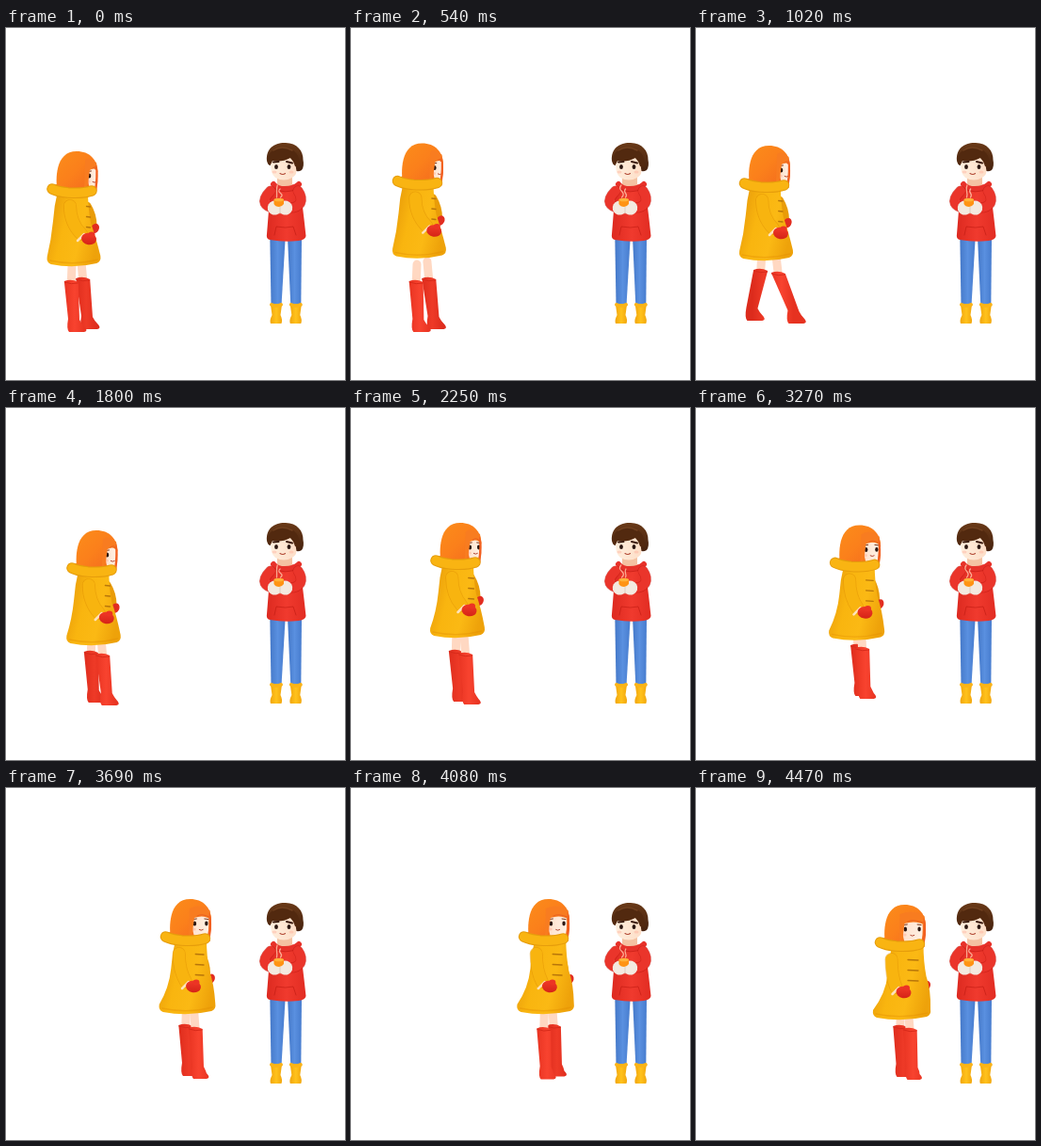
An HTML page with a canvas that plays this animation: 360 px wide and 374 px high, repeating every 4.5 s.

```html
<!DOCTYPE html>
<html lang="en">
<head>
<meta charset="utf-8">
<title>Winter walk</title>
<style>
html, body { margin: 0; width: 100%; height: 100%; overflow: hidden; background: #fff; }
canvas { display: block; width: 360px; height: 374px; }
</style>
</head>
<body>
<canvas id="stage"></canvas>
<script>
const W = 360, H = 374, STEP = 30, COUNT = 150;
const canvas = document.getElementById('stage');
const ctx = canvas.getContext('2d');
const dpr = window.devicePixelRatio || 1;
canvas.width = W * dpr;
canvas.height = H * dpr;

// step, body x, head top, turn (0 profile, 1 front), ground
const path = [
  [0, 72, 127, 0, 323],
  [24, 72.8, 127, .02, 322],
  [34, 74.5, 127, .04, 314],
  [60, 93, 126, .16, 316],
  [75, 113, 126, .25, 315],
  [95, 146.5, 125, .36, 310],
  [123, 192.5, 122, .68, 309],
  [149, 218.5, 124, 1, 310]
];
// phase within a footstep, head bob, distance between the feet
const stride = [
  [0, 4, -14], [3, -4, 11], [5, -4.5, 11], [8, -4, 30],
  [10, -2, 44], [11, 2, 38], [12, 4, 14]
];

const mix = (a, b, k) => a + (b - a) * k;
const clamp = v => Math.max(0, Math.min(1, v));

// Hermite curve through one column of a table
function curve(rows, x, col) {
  const last = rows.length - 1;
  let i = 0;
  while (i < last - 1 && x >= rows[i + 1][0]) i++;
  const slope = j => {
    const a = rows[Math.max(0, j - 1)], b = rows[Math.min(last, j + 1)];
    return (b[col] - a[col]) / (b[0] - a[0]);
  };
  const a = rows[i], b = rows[i + 1], d = b[0] - a[0];
  const k = (x - a[0]) / d, k2 = k * k, k3 = k2 * k;
  return (2 * k3 - 3 * k2 + 1) * a[col] + (k3 - 2 * k2 + k) * d * slope(i) +
    (3 * k2 - 2 * k3) * b[col] + (k3 - k2) * d * slope(i + 1);
}

function shade(x0, y0, x1, y1, ...colors) {
  const g = ctx.createLinearGradient(x0, y0, x1, y1);
  colors.forEach((c, i) => g.addColorStop(i / (colors.length - 1), c));
  return g;
}

function fill(d, color) {
  ctx.fillStyle = color;
  ctx.fill(new Path2D(d));
}

function line(d, color, width) {
  ctx.strokeStyle = color;
  ctx.lineWidth = width;
  ctx.stroke(new Path2D(d));
}

function oval(x, y, rx, ry, color, turn = 0) {
  ctx.fillStyle = color;
  ctx.beginPath();
  ctx.ellipse(x, y, rx, ry, turn, 0, Math.PI * 2);
  ctx.fill();
}

function boot(mid, reach, ground, toe, light, dark) {
  const spread = 9.5 * Math.tanh(reach / 9);
  const x = mid + reach, knee = 3.5 + spread, top = ground - 54;
  line(`M${3 + spread * .8} ${top - 18}L${knee} ${top + 2}`, '#ffd8c2', 9);
  fill(`M${knee - 7.5} ${top}Q${knee} ${top - 3} ${knee + 7.5} ${top + 1}
    L${x + 6} ${ground - 13}Q${x + 8} ${ground - 9} ${x + toe - 2} ${ground - 6}
    Q${x + toe + 3} ${ground - 1} ${x + toe - 2} ${ground}
    L${x - 5} ${ground}Q${x - 8} ${ground - 3} ${x - 6} ${ground - 14}Z`,
    shade(knee - 9, 0, knee + 16, 0, dark, light, dark));
  line(`M${knee - 7} ${top + 1}Q${knee} ${top + 4} ${knee + 7} ${top + 2}`, '#d82a1a', 1);
}

function girlHead(u) {
  fill('M-17 46C-20 30-20 0 3 0C17 0 25 9 25.5 22L24 45Z',
    shade(-18, 0, 22, 40, '#fb8c1a', '#fb801b', '#f46b1e'));
  const left = mix(15, 1, u), right = mix(24, 22, u);
  fill(`M${left} 18L${right} 18Q${right + 1} 34 ${right - 2} 41
    Q${mix(left, right, .5)} 46 ${left + 2} 40Q${left - 1} 30 ${left} 18Z`,
    shade(left, 0, right, 0, '#ffe1cd', '#fff0e3'));

  const eye = mix(16.5, 3.8, u), eye2 = mix(24, 18.6, u);
  oval(eye, 26, 1.8, 2.5, '#2b1712');
  line(`M${eye - 2} 21.5L${eye + 2} 21`, '#7a3517', 1);
  if (u > .2) {
    oval(eye2, 26, 1.7, 2.4, '#2b1712');
    line(`M${eye2 - 2} 21L${eye2 + 2} 21.5`, '#7a3517', 1);
  }
  const mouth = mix(22, 11.3, u);
  line(`M${mouth - 2} 32.5Q${mouth} 34 ${mouth + 2} 32.5`, '#b14632', 1);
  oval(eye - 1, 32, 2.4, 1.5, 'rgba(255,165,140,.4)');

  // fringe and side locks
  fill(`M${left - 3} 10Q12 4 24 12L25.5 22Q${mix(22, 15, u)} 16 ${left + 2} 20L${left} 35L${left - 4} 42Z`, '#f87c20');
  fill('M23 14Q26 18 25.5 32L24 43L22 40Q24 28 23 14Z', '#f26022');
  line(`M${left + 5} 18Q${left + 10} 15 23 19`, '#ea601f', 1);
}

function girl(f) {
  const phase = f % 12, side = Math.floor(f / 12) % 2 ? -1 : 1;
  const sway = 1 - clamp((f - 136) / 10);
  const x = curve(path, f, 1);
  const y = curve(path, f, 2) + curve(stride, phase, 1) * sway;
  const u = clamp(curve(path, f, 3));
  const ground = curve(path, f, 4) - y;
  const reach = curve(stride, phase, 2) * side / 2;
  const mid = 7 - u * 1.5, toe = mix(13, 10, u);

  ctx.save();
  ctx.translate(x, y);

  boot(mid, -reach, ground - 3, toe, '#ee3a27', '#dc2b1c');
  boot(mid, reach, ground, toe, '#f8432f', '#e63220');

  // far arm
  line('M14 58Q20 68 20 79', '#e99c08', 9);
  oval(mix(22.5, 26, u), mix(82, 86, u), 4.2, 5.5, '#e22d20', .5);

  const hem = mix(28.3, 30.5, u);
  const back = mix(-20, -13, u), front = mix(15, 23, u);
  fill(`M${back + 3} 42Q${back - 1} 58 ${back - 2} 74Q${back - 4} 94 ${-hem} 112
    Q${-hem - 1} 118 ${4 - hem} 120Q0 125 ${hem - 4} 119Q${hem + 1} 117 ${hem} 111
    Q${front + 8} 90 ${front + 3} 76Q${front} 60 ${front} 42Z`,
    shade(-hem, 70, hem, 84, '#e99c0a', '#f9b50f', '#fbb914', '#eea20a'));
  line(`M${3 - hem} 116Q0 122 ${hem - 3} 115`, 'rgba(226,140,0,.4)', 1.4);

  // toggles
  const tx = mix(15.5, 12, u), tw = mix(2, 5.5, u);
  for (const ty of [59, 70, 81]) line(`M${tx - tw} ${ty - .5}L${tx + tw} ${ty}`, '#b8760a', 1.3);

  // near arm
  const hand = mix(16, 2, u), sx = mix(-4, -11, u);
  const sleeve = `M${sx} 58Q${sx} 76 ${hand - 8} 88`;
  line(sleeve, 'rgba(214,134,0,.4)', 14);
  line(sleeve, '#f8b40f', 12.5);
  line(`M${hand - 12} 95L${hand - 5} 88`, '#ffe3bd', 2.5);
  oval(hand, 93, 8, 6.3, shade(0, 86, 0, 100, '#f23b29', '#d42216'), .15);
  oval(hand + 3, 88.5, 3.5, 3, '#ec3424');

  // hood and head
  oval(-2, 40, 25, 6.5, '#e39206');
  girlHead(u);
  const rim = 'M-23 40Q-17 43-6 44Q10 45 19 42';
  line(rim, '#e69d0b', 11.5);
  line(rim, '#f9b412', 9.5);
  ctx.restore();
}

// one trouser leg from hip x to foot x, with its boot
function manLeg(hip, foot, w) {
  fill(`M${hip - w} 222H${hip + w}L${foot + 5.5} 295H${foot - 5.5}Z`,
    shade(hip - w, 0, hip + w, 0, '#4478c8', '#5a90e0', '#477cce'));
  fill(`M${foot - 6} 294L${foot - 4.5} 305Q${foot - 7.5} 311 ${foot - 6} 314H${foot + 5.5}Q${foot + 7} 310 ${foot + 4.5} 305L${foot + 6} 294Z`,
    shade(foot - 7, 0, foot + 7, 0, '#f0a30c', '#ffc21c', '#f0a30c'));
  line(`M${foot - 5} 294Q${foot} 296 ${foot + 5} 294`, '#fbb418', 4);
}

function manHead() {
  fill('M288 156H304V170Q296 174 288 170Z', '#f4c2a2');
  fill('M277 141C276 128 285 121.5 297 122C309 122 316 131 315.5 140Q317 147 314 151Q309 154 305 150L284 146Q278 147 277 141Z',
    shade(0, 121, 0, 153, '#6a3a18', '#45220f'));
  fill('M281 140Q296 132 307 141L308 149Q310 155 304 159Q295 164 286 159Q280 154 281 140Z',
    shade(281, 0, 312, 0, '#ffeedd', '#fddcc4'));
  fill('M278 144Q276 128 296 127Q312 128 312 148L307 147Q306 142 302 138Q293 143 283 141Q282 144 280 146Z', '#52290f');
  line('M284 130Q293 124 304 130', '#70401f', 1.5);
  line('M284 142.5L289.5 142', '#3b1c0f', 2);
  line('M298 142L304 143.5', '#3b1c0f', 2);
  oval(287, 147.5, 1.9, 2.5, '#2b1712');
  oval(300.5, 147.5, 1.9, 2.5, '#2b1712');
  oval(285, 153, 2.5, 1.5, 'rgba(255,160,140,.35)');
  oval(303, 153, 2.5, 1.5, 'rgba(255,160,140,.35)');
  line('M291 154.5Q294 156.5 296.5 154.5', '#b14632', 1.1);
}

function man(f) {
  manLeg(288.5, 287, 8.2);
  manLeg(306.5, 307.8, 7.5);
  fill('M281 169Q297 162 312 169Q315 188 318.5 221Q318 225 311 226Q296 228 280 225Q276 224 277 219Z',
    shade(277, 0, 319, 0, '#dd2a20', '#f03a2e', '#e12c22'));
  line('M285 220L287 211Q297 213 305 211L308 220', 'rgba(190,25,18,.6)', 1);
  manHead();
  line('M284 166Q288 171 296 171Q306 171 311 166', '#e7322a', 6);
  line('M284 170Q296 178 311 170', 'rgba(190,25,18,.6)', 1);

  const arms = ['M281 173Q273 181 275 186Q277 190 284 191', 'M310 173Q315 180 312.5 186Q309 191 302 191'];
  for (const a of arms) {
    line(a, 'rgba(190,25,18,.6)', 11);
    line(a, '#ea352b', 10);
  }
  oval(285.5, 191, 7.8, 7.5, '#f3eae0', -.3);
  oval(296.5, 191, 7.8, 7.5, '#f3eae0', .3);
  line('M291 190V197', '#ddd0c2', 1);
  fill('M284.5 182H295V187Q293 190 290 190Q286 190 284.5 187Z', '#ff9414');
  oval(289.8, 182.5, 5.2, 1.8, '#ffb43a');

  // steam
  for (const [x, top] of [[287.5, 167], [291.5, 171]]) {
    const s = Math.sin(f / COUNT * Math.PI * 10 + x) * 1.8;
    const h = (180 - top) / 2;
    line(`M${x} 180Q${x + 2 + s} ${180 - h / 2} ${x} ${180 - h}T${x - s * .4} ${top}`, 'rgba(255,190,165,.85)', 1.3);
  }
}

function draw(f) {
  ctx.setTransform(dpr, 0, 0, dpr, 0, 0);
  ctx.fillStyle = '#fff';
  ctx.fillRect(0, 0, W, H);
  ctx.lineCap = ctx.lineJoin = 'round';
  man(f);
  girl(f);
}

const start = performance.now();
function tick(now) {
  draw(Math.floor(Math.max(0, now - start) / STEP) % COUNT);
  requestAnimationFrame(tick);
}
draw(0);
requestAnimationFrame(tick);
</script>
</body>
</html>
```
